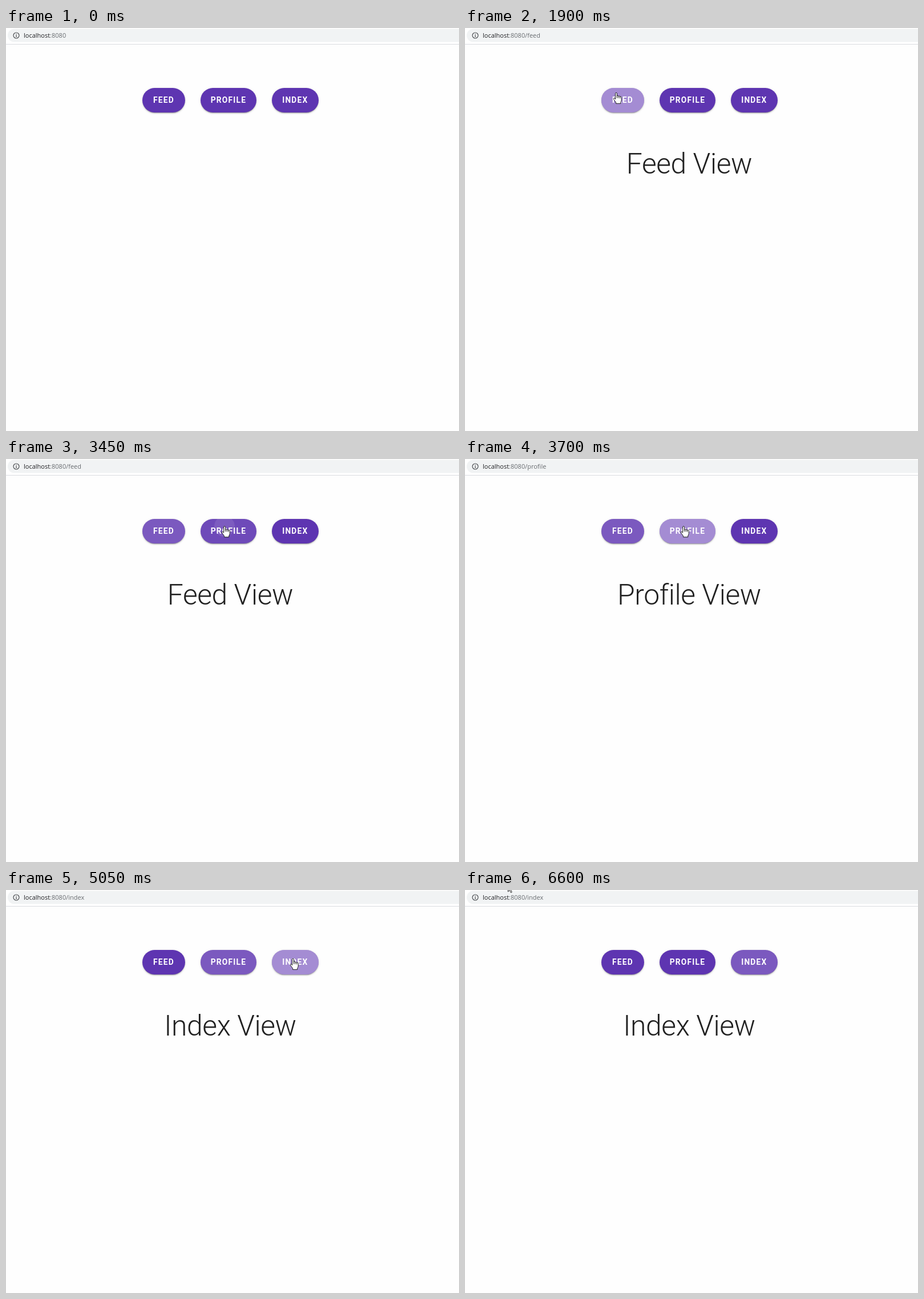
An HTML page for the animation above (7100 ms loop, 794 px wide and 706 px high).

```html
<!DOCTYPE html>
<html lang="en">
<head>
<meta charset="utf-8">
<title>Routed views</title>
<style>
html, body { margin: 0; width: 100%; height: 100%; overflow: hidden; background: #fefefe; }
#stage { position: relative; width: 794px; height: 706px; overflow: hidden; background: #fefefe; }
svg { position: absolute; left: 0; top: 0; }
.btn {
  position: absolute; top: 104.5px; height: 43px; border-radius: 21.5px; overflow: hidden;
  background: #5e35b1;
  box-shadow: 0 2.5px .8px -1.6px rgba(0,0,0,.2), 0 1.7px 1.7px rgba(0,0,0,.14), 0 .8px 4px rgba(0,0,0,.12);
}
.btn span {
  position: absolute; inset: 0; text-align: center;
  font: 700 13.8px/43px Roboto, sans-serif; letter-spacing: 1.2px; color: #fff;
}
.tint { position: absolute; inset: 0; background: #fff; }
.ripple { position: absolute; border-radius: 50%; background: #fff; }
.url { font: 11px "Open Sans", sans-serif; fill: #202124; }
.view { font: 300 49.8px Roboto, sans-serif; letter-spacing: -.415px; fill: #212121; text-anchor: middle; }
</style>
</head>
<body>
<div id="stage">
  <svg width="794" height="706">
    <rect width="794" height="28" fill="#fff"/>
    <rect x="3" y="1.5" width="820" height="23" rx="11.5" fill="#f1f3f4"/>
    <rect y="28" width="794" height="1" fill="#dadce0"/>
    <circle cx="18" cy="13" r="5" fill="none" stroke="#4a4d51" stroke-width="1.2"/>
    <path d="M18 12.3V16M18 10V11.3" stroke="#4a4d51" stroke-width="1.3"/>
    <text class="url" x="31" y="17">localhost<tspan id="path" fill="#686c70"></tspan></text>
    <text class="view" id="view" x="393" y="255.4"></text>
  </svg>
  <div id="buttons"></div>
  <svg width="794" height="706">
    <g id="cursor" stroke-linejoin="round" stroke-linecap="round">
      <path id="arrow" fill="#fff" stroke="#111" stroke-width=".9"
        d="M.4 .6V14L3.3 11.3L5.3 15.6L7.2 14.8L5.3 10.5H9.6Z"/>
      <g id="hand" stroke="#111" stroke-width=".95">
        <path fill="#fff" d="M-1.4 11.3V1.6C-1.4 -.1 1.4 -.1 1.4 1.6V6C1.8 5.1 4 5.2 4 6.8C4.5 5.9 6.6 6 6.7 7.4C7.3 6.6 9.2 6.9 9.2 8.6V13C9.2 15 8 16 7.7 17.5V19.3H-.4V17.7C-1 16 -3.4 13.6 -4.5 11.5C-5.2 9.7 -3.1 8.9 -1.4 11.3Z"/>
        <path fill="none" d="M1.4 6V9.3M4 6.8V9.6M6.7 7.4V9.9"/>
      </g>
    </g>
  </svg>
</div>
<script>
const LOOP = 7100, STEP = 50;
const $ = id => document.getElementById(id);

// click: press time; enter: start of hover; leave: press of the next button
const items = [
  { name: "Feed", x: 238.7, w: 75.6, enter: 900, click: 1750, leave: 3450, px: 265, py: 113 },
  { name: "Profile", x: 340.6, w: 98.8, enter: 2450, click: 3450, leave: 4900, px: 383, py: 118 },
  { name: "Index", x: 465.7, w: 82.3, enter: 4250, click: 4900, leave: 1e5, px: 503, py: 120 }
];

// pointer tip: time, x, y
const route = [
  [250, 64, -18], [300, 71, -11], [1000, 262, 105], [1050, 262, 105], [1300, 265, 113],
  [2200, 265, 113], [2400, 334.3, 110.3], [2850, 383, 117.5], [3900, 383, 117.5],
  [4300, 483, 115.5], [4550, 503, 120], [5550, 503, 120],
  [6300, 82, -11], [6350, 82, -11], [6600, 75, -11]
];

for (const b of items) {
  b.el = document.createElement("div");
  b.el.className = "btn";
  b.el.style.left = b.x + "px";
  b.el.style.width = b.w + "px";
  b.el.innerHTML = `<div class="tint"></div><div class="ripple"></div><span>${b.name.toUpperCase()}</span>`;
  [b.tint, b.ripple] = b.el.children;
  $("buttons").append(b.el);
}

const smooth = p => p * p * (3 - 2 * p);

// value of column c at time t in a list of keys
function track(keys, t, c = 1, ease = p => p) {
  if (t <= keys[0][0]) return keys[0][c];
  for (let i = 1; i < keys.length; i++) {
    const a = keys[i - 1], b = keys[i];
    if (t <= b[0]) return a[c] + (b[c] - a[c]) * ease((t - a[0]) / (b[0] - a[0]));
  }
  return keys[keys.length - 1][c];
}

function drawButton(b, t) {
  const d = t - b.click;
  b.tint.style.opacity = track([
    [b.enter, 0], [b.enter + 100, .08], [b.click - 50, .08], [b.click, .1],
    [b.click + 150, .24], [b.click + 250, .24], [b.click + 350, .18],
    [b.leave + 250, .18], [b.leave + 350, 0]
  ], t);
  const r = track([[0, 18], [150, 76]], d);
  const s = b.ripple.style;
  s.opacity = track([[-1, 0], [0, .1], [150, .25], [250, .25], [350, 0]], d);
  s.left = b.px - b.x - r + "px";
  s.top = b.py - 104.5 - r + "px";
  s.width = s.height = 2 * r + "px";
}

function inside(b, x, y) {
  const cx = Math.min(Math.max(x, b.x + 21.5), b.x + b.w - 21.5);
  return Math.hypot(x - cx, y - 126) <= 21.5;
}

function render(time) {
  const t = Math.floor((time % LOOP) / STEP) * STEP;
  items.forEach(b => drawButton(b, t));

  const open = items.filter(b => t >= b.click + 100).pop();
  $("path").textContent = ":8080" + (open ? "/" + open.name.toLowerCase() : "");
  $("view").textContent = open ? open.name + " View" : "";

  const x = track(route, t, 1, smooth), y = track(route, t, 2, smooth);
  const over = items.some(b => inside(b, x, y));
  $("cursor").setAttribute("transform", `translate(${x} ${y})`);
  $("cursor").style.display = t < 300 ? "none" : "";
  $("arrow").style.display = over ? "none" : "";
  $("hand").style.display = over ? "" : "none";
}

const start = performance.now();
function tick() {
  render(performance.now() - start);
  requestAnimationFrame(tick);
}
tick();
</script>
</body>
</html>
```
